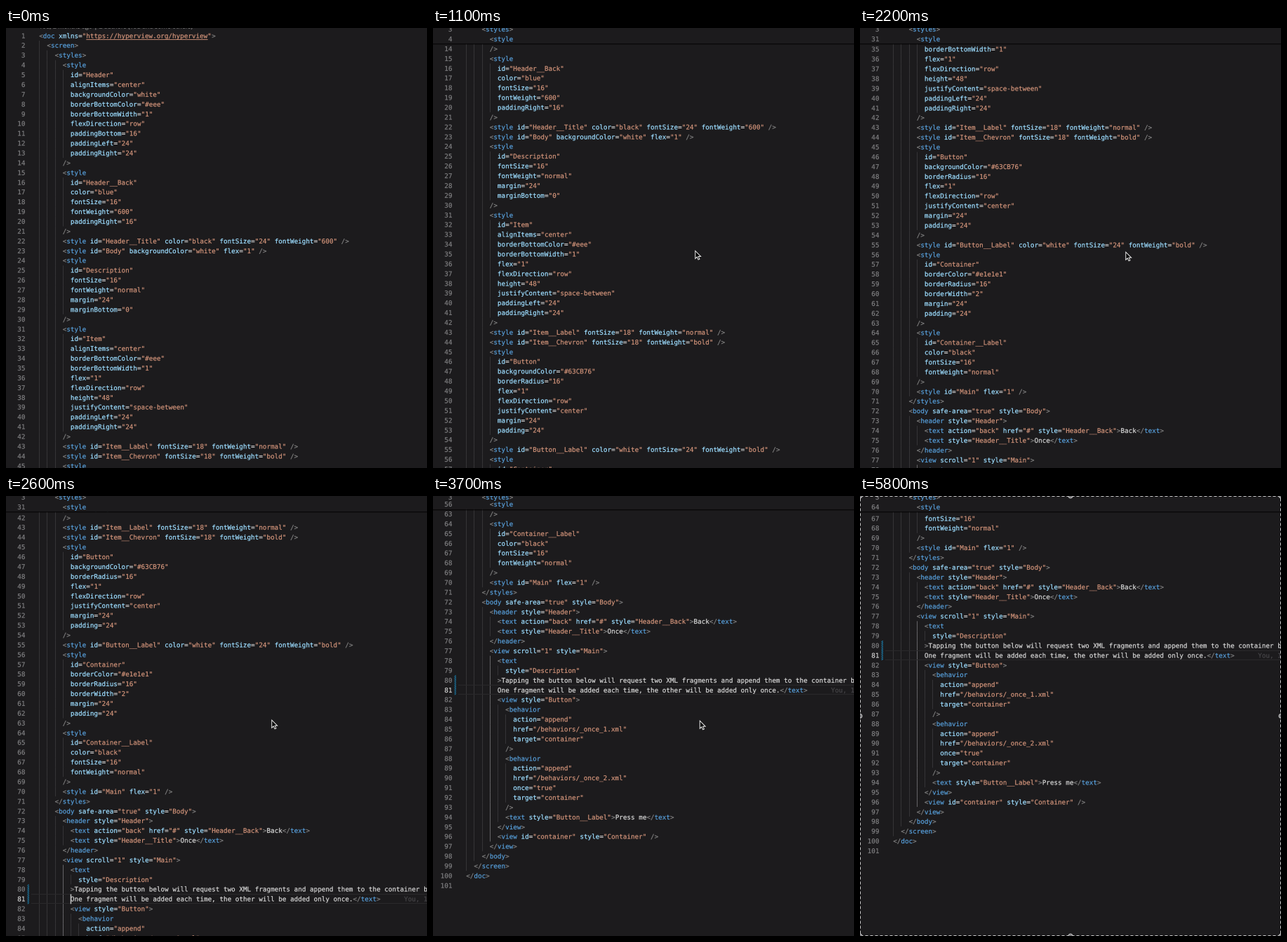
An HTML page with a canvas for the animation above (5900 ms loop, 600 by 627 pixels).

```html
<!DOCTYPE html>
<html lang="en">
<head>
<meta charset="utf-8">
<title>Scrolling through markup</title>
<style>
html, body { margin: 0; width: 100%; height: 100%; overflow: hidden; background: #1c1b1d; }
canvas { display: block; width: 600px; height: 627px; }
</style>
</head>
<body>
<canvas id="stage" width="1200" height="1254"></canvas>
<script>
const SOURCE = `<doc xmlns="https://hyperview.org/hyperview">
  <screen>
    <styles>
      <style
        id="Header"
        alignItems="center"
        backgroundColor="white"
        borderBottomColor="#eee"
        borderBottomWidth="1"
        flexDirection="row"
        paddingBottom="16"
        paddingLeft="24"
        paddingRight="24"
      />
      <style
        id="Header__Back"
        color="blue"
        fontSize="16"
        fontWeight="600"
        paddingRight="16"
      />
      <style id="Header__Title" color="black" fontSize="24" fontWeight="600" />
      <style id="Body" backgroundColor="white" flex="1" />
      <style
        id="Description"
        fontSize="16"
        fontWeight="normal"
        margin="24"
        marginBottom="0"
      />
      <style
        id="Item"
        alignItems="center"
        borderBottomColor="#eee"
        borderBottomWidth="1"
        flex="1"
        flexDirection="row"
        height="48"
        justifyContent="space-between"
        paddingLeft="24"
        paddingRight="24"
      />
      <style id="Item__Label" fontSize="18" fontWeight="normal" />
      <style id="Item__Chevron" fontSize="18" fontWeight="bold" />
      <style
        id="Button"
        backgroundColor="#63CB76"
        borderRadius="16"
        flex="1"
        flexDirection="row"
        justifyContent="center"
        margin="24"
        padding="24"
      />
      <style id="Button__Label" color="white" fontSize="24" fontWeight="bold" />
      <style
        id="Container"
        borderColor="#e1e1e1"
        borderRadius="16"
        borderWidth="2"
        margin="24"
        padding="24"
      />
      <style
        id="Container__Label"
        color="black"
        fontSize="16"
        fontWeight="normal"
      />
      <style id="Main" flex="1" />
    </styles>
    <body safe-area="true" style="Body">
      <header style="Header">
        <text action="back" href="#" style="Header__Back">Back</text>
        <text style="Header__Title">Once</text>
      </header>
      <view scroll="1" style="Main">
        <text
          style="Description"
        >Tapping the button below will request two XML fragments and append them to the container below.
        One fragment will be added each time, the other will be added only once.</text>
        <view style="Button">
          <behavior
            action="append"
            href="/behaviors/_once_1.xml"
            target="container"
          />
          <behavior
            action="append"
            href="/behaviors/_once_2.xml"
            once="true"
            target="container"
          />
          <text style="Button__Label">Press me</text>
        </view>
        <view id="container" style="Container" />
      </view>
    </body>
  </screen>
</doc>
`;

const W = 600, H = 627, LOOP = 5900, STEP = 100;
const DENSITY = 2; // backing pixels per stage pixel, for smooth scrolling between rows
const FONT = 9.288, CHAR = FONT * 0.60205, ROW = FONT * 1.5;
const LEFT = 47.2, FIRST_Y = 11, BASELINE = 3.3;
const MONO = FONT + 'px "DejaVu Sans Mono", monospace';
const ACTIVE = 81;
const STICKY_Y = [1.5, 15.5];
const BLOCKS = [[4, 14], [15, 21], [24, 30], [31, 42], [45, 54], [56, 63], [64, 69]];
const SELECT_AT = 5200;
const INK = {
  bg: '#1c1b1d', mark: '#808080', tag: '#569cd6', attr: '#9cdcfe',
  string: '#ce9178', text: '#d4d4d4', number: '#7d7d7f', guide: '#353437'
};

// Points are [time, value...]
const SCROLL = [[0, 0], [700, 73.8], [1500, 266.4], [2200, 454.3], [2600, 551.2], [3700, 849.1], [4200, 898.5]];
const POINTER = [[100, 497, 328], [400, 373, 317], [700, 371, 316.5], [1500, 375, 317], [2200, 378, 318.5], [2600, 378, 318.5], [3700, 379.5, 319.5]];

const ctx = document.getElementById('stage').getContext('2d');
ctx.scale(DENSITY, DENSITY);
const lines = tokenize(SOURCE);

function tokenize(source) {
  let inTag = false, prev = '';
  return source.split('\n').map(line => {
    const tokens = [];
    for (const m of line.matchAll(/<\/?|\/?>|"[^"]*"|=|[^\s<>"=\/]+/g)) {
      const s = m[0];
      let kind = 'text';
      if (s[0] === '<') { kind = 'mark'; inTag = true; }
      else if (s.endsWith('>')) { kind = 'mark'; inTag = false; }
      else if (s[0] === '"') kind = 'string';
      else if (inTag && s !== '=') kind = prev[0] === '<' ? 'tag' : 'attr';
      tokens.push({ s, kind, col: m.index });
      prev = s;
    }
    return { tokens, indent: tokens.length ? tokens[0].col : 0 };
  });
}

// Piecewise cubic through the points, at rest at both ends
function smooth(points, t) {
  const last = points.length - 1;
  if (t >= points[last][0]) return points[last][1];
  const slope = i => i === 0 || i === last ? 0 :
    (points[i + 1][1] - points[i - 1][1]) / (points[i + 1][0] - points[i - 1][0]);
  let i = 0;
  while (t >= points[i + 1][0]) i++;
  const [t0, a] = points[i], [t1, b] = points[i + 1];
  const d = t1 - t0, u = (t - t0) / d, v = 1 - u;
  return a * (1 + 2 * u) * v * v + b * u * u * (3 - 2 * u) +
    d * u * v * (slope(i) * v - slope(i + 1) * u);
}

function linear(points, t) {
  let i = 0;
  while (i < points.length - 2 && t >= points[i + 1][0]) i++;
  const p = points[i], q = points[i + 1];
  const u = Math.min(1, Math.max(0, (t - p[0]) / (q[0] - p[0])));
  return [p[1] + (q[1] - p[1]) * u, p[2] + (q[2] - p[2]) * u];
}

function rect(color, x, y, w, h) {
  ctx.fillStyle = color;
  ctx.fillRect(x, y, w, h);
}

// The hairline stroke gives the slightly heavier screen weight
function write(s, x, y, color, align = 'left') {
  ctx.fillStyle = ctx.strokeStyle = color;
  ctx.lineWidth = 0.22;
  ctx.textAlign = align;
  ctx.fillText(s, x, y + BASELINE);
  ctx.strokeText(s, x, y + BASELINE);
}

function drawLine(n, y) {
  write(n, 27.4, y, n === ACTIVE ? '#d0d0d0' : INK.number, 'right');
  for (const { s, kind, col } of lines[n - 1].tokens) {
    const x = LEFT + col * CHAR;
    write(s, x, y, INK[kind]);
    if (s.startsWith('"http')) rect(INK.string, x + CHAR, y + 5, (s.length - 2) * CHAR, 0.9);
  }
}

function drawGuides(n, y) {
  for (let col = 0; col < lines[n - 1].indent; col += 2) {
    const active = col === 6 && n >= 78 && n <= 96;
    rect(active ? '#656467' : INK.guide, Math.round(LEFT + col * CHAR), y - ROW / 2, 1, ROW);
  }
}

function drawActiveLine(y, caretOn) {
  const top = y - ROW / 2;
  rect('#2a292b', 36, Math.round(top), W, 1);
  rect('#2a292b', 36, Math.round(top + ROW) - 1, W, 1);
  write('You, 1 second ago • Uncommitted changes', LEFT + 93 * CHAR, y, '#464548');
  if (caretOn) rect('#c4c4c4', 91.7, top, 1.5, ROW);
}

function drawChangeBar(top, height) {
  ctx.save();
  ctx.beginPath();
  ctx.rect(30.5, top, 2.5, height);
  ctx.clip();
  ctx.strokeStyle = '#1b81b0';
  ctx.lineWidth = 1;
  ctx.beginPath();
  for (let y = top; y < top + height + 4; y += 2.6) {
    ctx.moveTo(30, y);
    ctx.lineTo(34, y - 4);
  }
  ctx.stroke();
  ctx.restore();
}

function drawSticky(lineY) {
  if (lineY(3) >= STICKY_Y[0]) return;
  let bottom = STICKY_Y[0] + ROW / 2;
  for (const [start, end] of BLOCKS) {
    const y = Math.min(STICKY_Y[1], lineY(end) - ROW);
    if (lineY(start) >= STICKY_Y[1] || y <= STICKY_Y[0]) continue;
    bottom = y + ROW / 2;
    rect(INK.bg, 0, 0, W, bottom);
    drawLine(start, y);
  }
  rect(INK.bg, 0, 0, W, STICKY_Y[0] + ROW / 2 - 1);
  drawLine(3, STICKY_Y[0]);
  rect('rgba(0,0,0,.65)', 0, Math.round(bottom), W, 1);
  rect('rgba(0,0,0,.3)', 0, Math.round(bottom) + 1, W, 1);
}

function drawPointer([x, y]) {
  ctx.save();
  ctx.translate(x + 0.8, y + 0.8);
  ctx.beginPath();
  ctx.moveTo(0, 0);
  for (const [px, py] of [[0, 11], [2.5, 8.7], [4.3, 12.6], [6.1, 11.8], [4.4, 8], [7.8, 8]]) ctx.lineTo(px, py);
  ctx.closePath();
  ctx.fillStyle = '#000';
  ctx.fill();
  ctx.strokeStyle = '#eee';
  ctx.lineWidth = 1;
  ctx.stroke();
  ctx.restore();
}

function drawSelection() {
  ctx.save();
  ctx.strokeStyle = '#c8c8c8';
  ctx.lineWidth = 1;
  ctx.setLineDash([4, 3]);
  ctx.strokeRect(0.5, 0.5, W - 1, H - 1);
  ctx.setLineDash([]);
  ctx.fillStyle = '#77767a';
  for (const x of [0, W / 2, W]) {
    for (const y of [0, H / 2, H]) {
      if (x === W / 2 && y === H / 2) continue;
      ctx.beginPath();
      ctx.arc(x, y, 3, 0, Math.PI * 2);
      ctx.fill();
      ctx.stroke();
    }
  }
  ctx.restore();
}

function draw(t) {
  const scroll = smooth(SCROLL, t);
  const lineY = n => FIRST_Y + (n - 1) * ROW - scroll;
  const caretOn = Math.floor((t - 2600) / 290) % 2 === 0;

  rect(INK.bg, 0, 0, W, H);
  ctx.textRendering = 'geometricPrecision';
  ctx.font = '8.8px "Open Sans", sans-serif';
  write('You, 2 months ago | 2 authors (You and some others)', LEFT, lineY(0), '#8a8a8a');
  ctx.font = MONO;

  for (let n = 1; n <= lines.length; n++) {
    const y = lineY(n);
    if (y < -ROW || y > H + ROW) continue;
    drawGuides(n, y);
    drawLine(n, y);
    if (n === ACTIVE) drawActiveLine(y, caretOn);
  }
  drawChangeBar(lineY(80) - ROW / 2, ROW * 2);
  drawSticky(lineY);
  if (t >= SELECT_AT) drawSelection();
  else if (t >= POINTER[0][0]) drawPointer(linear(POINTER, t));
}

const began = performance.now();
let shown = -1;
function tick() {
  const t = Math.floor((performance.now() - began) % LOOP / STEP) * STEP;
  if (t !== shown) draw(shown = t);
  requestAnimationFrame(tick);
}
tick();
</script>
</body>
</html>
```
